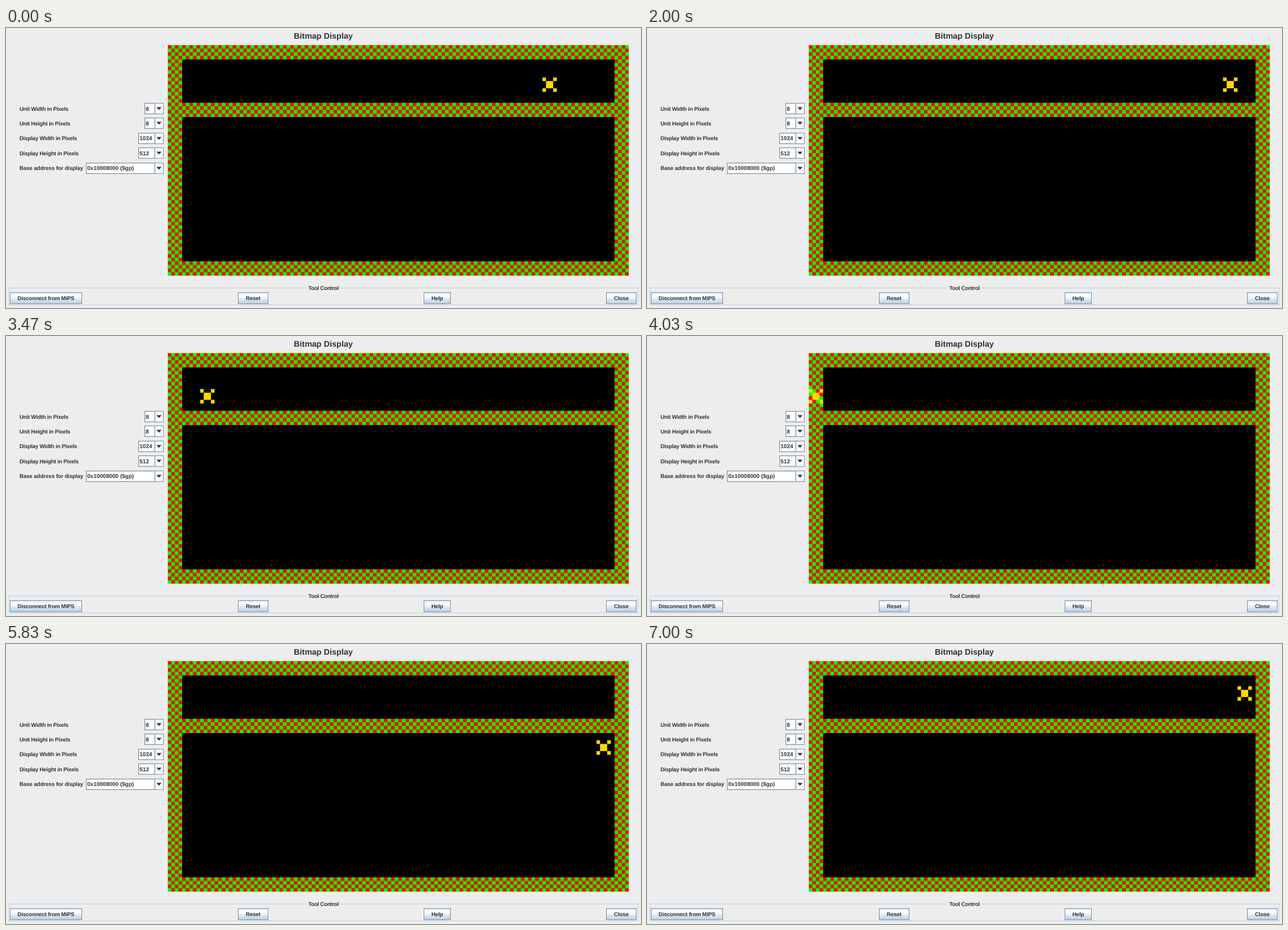
Animation of 1128 by 497 pixels, one loop 7790 ms. Source, as an HTML page with a canvas:

```html
<!DOCTYPE html>
<html lang="en">
<head>
<meta charset="utf-8">
<title>Bitmap Display</title>
<style>
html, body { margin: 0; width: 100%; height: 100%; overflow: hidden; background: #ededed; }
svg, canvas { position: absolute; left: 0; top: 0; display: block; }
canvas { transform-origin: 0 0; transform: translate(287.3px, 30.2px) scale(.8); }
text { font-family: "Liberation Sans", Arial, sans-serif; font-weight: bold; fill: #333; text-rendering: geometricPrecision; }
</style>
</head>
<body>
<svg id="ui" width="1128" height="497" viewBox="0 0 1128 497">
  <defs>
    <linearGradient id="face" x1="0" y1="0" x2="0" y2="1">
      <stop offset="0" stop-color="#dde8f3"/>
      <stop offset=".3" stop-color="#fff"/>
      <stop offset=".6" stop-color="#dde8f3"/>
      <stop offset="1" stop-color="#b8cfe5"/>
    </linearGradient>
  </defs>
</svg>
<canvas id="screen" width="1024" height="512"></canvas>
<script>
const ui = document.getElementById('ui');

function add(tag, attrs, content = '') {
  const el = document.createElementNS('http://www.w3.org/2000/svg', tag);
  for (const key in attrs) el.setAttribute(key, attrs[key]);
  el.textContent = content;
  ui.append(el);
}

function label(content, x, y, { size = 9.8, spacing = -.15, anchor = 'start' } = {}) {
  add('text', { x, y, 'font-size': size, 'letter-spacing': spacing, 'text-anchor': anchor }, content);
}

function box(x, y, w, h, fill, stroke) {
  add('rect', { x: x + .5, y: y + .5, width: w - 1, height: h - 1, fill, stroke });
}

function combo(name, value, x, line, spacing = -.23) {
  const base = 146.6 + line * 26.4;
  const y = Math.round(133 + line * 26.4);
  label(name, 24, base, { spacing });
  box(x, y, 280 - x, 20, '#fff', '#7a8a99');
  box(x + 1, y + 1, 263 - x, 18, '#fff', '#dce6f0');
  box(264, y, 16, 20, '#fafcfe', '#7a8a99');
  add('path', { d: `M267.3 ${y + 7.5}h9l-4.5 5z`, fill: '#333' });
  label(value, x + 2.3, base, { size: 10, spacing: 0 });
}

function button(name, x, w) {
  box(x, 469, w, 21, 'url(#face)', '#7a8a99');
  label(name, x + w / 2, 483.3, { anchor: 'middle' });
}

label('Bitmap Display', 563.7, 18.5, { size: 14.5, spacing: 0, anchor: 'middle' });
combo('Unit Width in Pixels', '8', 246, 0);
combo('Unit Height in Pixels', '8', 246, 1);
combo('Display Width in Pixels', '1024', 235, 2);
combo('Display Height in Pixels', '512', 235, 3);
combo('Base address for display', '0x10008000 ($gp)', 142, 4, -.12);

box(5, 461, 1118, 31, 'none', '#b8cfe5');
add('rect', { x: 535, y: 460, width: 58, height: 3, fill: '#ededed' });
label('Tool Control', 564, 465.2, { spacing: -.3, anchor: 'middle' });
button('Disconnect from MIPS', 7, 128);
button('Reset', 412, 54);
button('Help', 742, 48);
button('Close', 1066, 54);

// Frame buffer: 128 x 64 units, addressed linearly, so sideways moves wrap into the next row.
const COLS = 128, ROWS = 64, UNIT = 8, FPS = 30, LOOP = 7790;
const START = 9 * COLS + 104;
const SPRITE = ['#..#', '.##.', '.##.', '#..#'];
const ctx = document.getElementById('screen').getContext('2d');

// Key presses: first tick, number of steps, address change per step.
const MOVES = [
  [43, 1, 1], [51, 32, 1],
  [106, 1, -1], [114, 17, -1],
  [131, 1, COLS], [138, 17, COLS],
  [164, 1, -COLS], [172, 19, -COLS]
];

function cell(col, row, color) {
  ctx.fillStyle = color;
  ctx.fillRect(col * UNIT, row * UNIT, UNIT, UNIT);
}

function isWall(col, row) {
  return col < 4 || col > 123 || row < 4 || row > 59 || (row > 15 && row < 20);
}

function background(col, row) {
  if (!isWall(col, row)) return '#000';
  return (col + row) % 2 ? '#0f0' : '#f00';
}

function paintSprite(address, color) {
  SPRITE.forEach((line, dy) => [...line].forEach((mark, dx) => {
    if (mark !== '#') return;
    const at = address + dy * COLS + dx;
    const col = at % COLS, row = Math.floor(at / COLS);
    cell(col, row, color || background(col, row));
  }));
}

function addressAt(time) {
  const tick = Math.floor((time + 4) * FPS / 1000);
  return MOVES.reduce((at, [first, count, delta]) =>
    at + delta * Math.max(0, Math.min(count, tick - first + 1)), START);
}

for (let row = 0; row < ROWS; row++)
  for (let col = 0; col < COLS; col++) cell(col, row, background(col, row));

let shown = START;
function draw(time) {
  paintSprite(shown);
  shown = addressAt(time % LOOP);
  paintSprite(shown, '#ffd700');
}

draw(0);
const began = performance.now();
function loop() {
  draw(performance.now() - began);
  requestAnimationFrame(loop);
}
requestAnimationFrame(loop);
</script>
</body>
</html>
```
